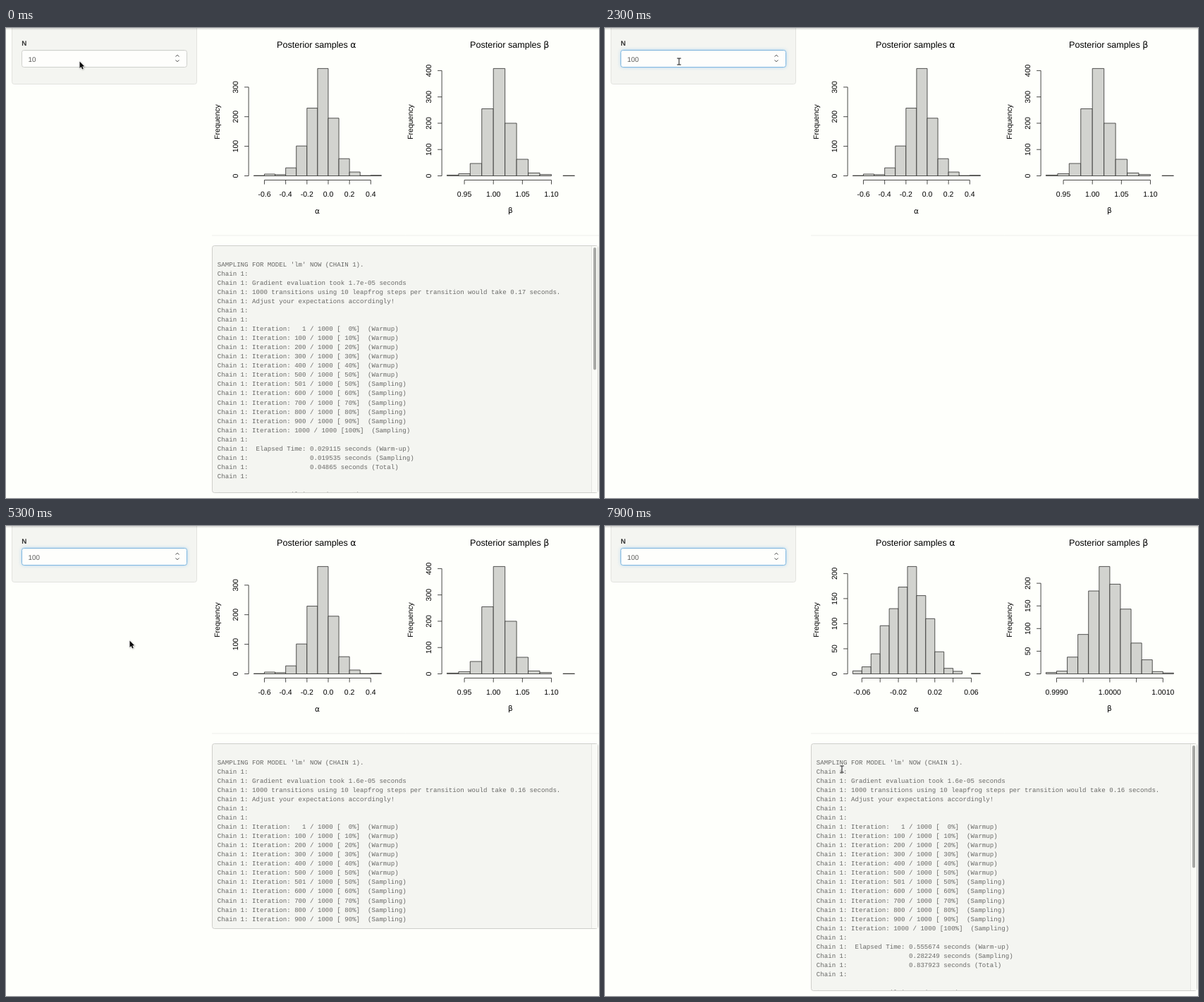
Recreate the animation shown at these times as an HTML page with a canvas. Size 841 by 666 pixels, loop 8 s.

```html
<!DOCTYPE html>
<html lang="en">
<head>
<meta charset="utf-8">
<title>Posterior samples</title>
<style>
  html, body { margin: 0; width: 100%; height: 100%; overflow: hidden; background: #fefffb; }
  canvas { display: block; }
</style>
</head>
<body>
<canvas id="stage" width="841" height="666"></canvas>
<script>
const ctx = document.getElementById('stage').getContext('2d');
const SANS = '"Liberation Sans", Arial, sans-serif';
const MONO = '"Liberation Mono", "Courier New", monospace';
const GREEK = '"DejaVu Sans", sans-serif';
const LOOP = 8000, STEP = 100;
const PAGE = '#fefffb', PANEL = '#f4f5f1', INK = '#1c1c1b', HAIR = 0.8;

const clamp = v => Math.min(1, Math.max(0, v));
const lerp = (a, b, p) => a + (b - a) * p;
const smooth = p => p * p * (3 - 2 * p);

// Draws a string and returns its width.
function text(str, x, y, size, { color = '#000', align = 'left', family = SANS, weight = '', turn = false } = {}) {
  ctx.save();
  ctx.font = `${weight} ${size}px ${family}`;
  ctx.textRendering = 'geometricPrecision';
  ctx.textAlign = align;
  ctx.fillStyle = color;
  ctx.translate(x, y);
  if (turn) ctx.rotate(-Math.PI / 2);
  ctx.fillText(str, 0, 0);
  const { width } = ctx.measureText(str);
  ctx.restore();
  return width;
}

function line(color, width, ...pts) {
  ctx.beginPath();
  pts.forEach(([x, y]) => ctx.lineTo(x, y));
  ctx.strokeStyle = color;
  ctx.lineWidth = width;
  ctx.stroke();
}

function box(x, y, w, h, r, fill, stroke) {
  ctx.beginPath();
  ctx.roundRect(x, y, w, h, r);
  if (fill) { ctx.fillStyle = fill; ctx.fill(); }
  if (stroke) { ctx.strokeStyle = stroke; ctx.lineWidth = HAIR; ctx.stroke(); }
}

// ---- histograms ----
const BASE = 209.5, PEAK = 57.4, SPAN = 181;

const before = [
  { counts: [1, 6, 4, 27, 101, 229, 363, 195, 58, 13, 1, 2], yStep: 100, yMax: 300,
    from: -0.7, to: 0.5, ticks: [-0.6, -0.4, -0.2, 0, 0.2, 0.4], digits: 1, every: 1 },
  { counts: [3, 8, 47, 255, 408, 200, 63, 11, 5, 0, 1], yStep: 100, yMax: 400,
    from: 0.92, to: 1.14, ticks: [0.95, 1, 1.05, 1.1], digits: 2, every: 1 }
];
const after = [
  { counts: [6, 14, 40, 96, 130, 173, 214, 156, 110, 44, 11, 5, 0, 1], yStep: 50, yMax: 200,
    from: -0.07, to: 0.07, ticks: [-0.06, -0.04, -0.02, 0, 0.02, 0.04, 0.06], digits: 2, every: 2 },
  { counts: [3, 6, 37, 87, 183, 237, 198, 143, 68, 31, 5, 2], yStep: 50, yMax: 200,
    from: 0.9988, to: 1.0012, ticks: [0.999, 0.9995, 1, 1.0005, 1.001], digits: 4, every: 2 }
];

function histogram(h, left, symbol, symbolY) {
  const unit = (BASE - PEAK) / Math.max(...h.counts);
  const yAt = n => BASE - n * unit;
  const xAt = v => left + SPAN * (v - h.from) / (h.to - h.from);
  const bin = SPAN / h.counts.length;
  const axisX = left - 7.3, axisY = 215.5, last = h.ticks.length - 1;

  const titleX = left + 32.6;
  const width = text('Posterior samples ', titleX, 28.2, 12.6);
  text(symbol, titleX + width, 28.2, 12.6, { family: GREEK });
  text('Frequency', left - 48, 133, 10.5, { align: 'center', turn: true });
  text(symbol, left + 90, symbolY, 10.5, { align: 'center', family: GREEK });

  h.counts.forEach((n, i) => {
    if (n) box(left + i * bin, yAt(n), bin, n * unit, 0, '#d2d3cf', '#2c2c2b');
  });

  line(INK, HAIR, [axisX, yAt(0)], [axisX, yAt(h.yMax)]);
  for (let n = 0; n <= h.yMax; n += h.yStep) {
    line(INK, HAIR, [axisX - 6, yAt(n)], [axisX, yAt(n)]);
    text(n, left - 22.6, yAt(n), 10.5, { align: 'center', turn: true });
  }
  line(INK, HAIR, [xAt(h.ticks[0]), axisY], [xAt(h.ticks[last]), axisY]);
  h.ticks.forEach((v, i) => {
    line(INK, HAIR, [xAt(v), axisY], [xAt(v), axisY + 6]);
    if (i % h.every === 0) text(v.toFixed(h.digits), xAt(v), 238.6, 10.5, { align: 'center' });
  });
}

// ---- sampler log ----
function sampleLog(setup, warm, sampling, total) {
  const body = [
    '', `Gradient evaluation took ${setup}e-05 seconds`,
    `1000 transitions using 10 leapfrog steps per transition would take 0.${setup.replace('.', '')} seconds.`,
    'Adjust your expectations accordingly!', '', ''
  ];
  for (const n of [1, 100, 200, 300, 400, 500, 501, 600, 700, 800, 900, 1000]) {
    const pct = String(Math.floor(n / 10)).padStart(3);
    body.push(`Iteration: ${String(n).padStart(3)} / 1000 [${pct}%]  (${n > 500 ? 'Sampling' : 'Warmup'})`);
  }
  const gap = ' '.repeat(15);
  body.push('', ` Elapsed Time: ${warm} seconds (Warm-up)`,
    `${gap}${sampling} seconds (Sampling)`, `${gap}${total} seconds (Total)`, '');
  const title = n => `SAMPLING FOR MODEL 'lm' NOW (CHAIN ${n}).`;
  return [title(1), ...body.map(s => 'Chain 1: ' + s), '', title(2)];
}
const firstLog = sampleLog('1.7', '0.029115', '0.019535', '0.04865');
const secondLog = sampleLog('1.6', '0.555674', '0.282249', '0.837923');

function consolePane(lines, bottom, scrolls) {
  const top = 308.5;
  box(292.5, top, 547, bottom - top, 3, PANEL, '#c4c5c1');
  ctx.save();
  ctx.beginPath();
  ctx.rect(293, 309, 546, bottom - 309.5);
  ctx.clip();
  ctx.fillStyle = '#f9faf6';
  ctx.fillRect(831, 309, 8, bottom - 309);
  line('#e4e5e1', 1, [830.5, 309], [830.5, bottom]);
  lines.forEach((s, i) => text(s, 299.8, 338.2 + i * 13.02, 9.12, { family: MONO, color: '#686866' }));
  ctx.restore();
  if (scrolls) box(833, 311, 4, 173.5, 2, '#a7a8a5');
}

// ---- input ----
function inputPanel(t) {
  const focus = t < 900 ? 0 : clamp((t - 800) / 300);
  const value = t < 1900 ? '10' : '100';
  const caret = (t >= 900 && t < 2100) || (t >= 3300 && t < 4500) || (t >= 5700 && t < 6900);

  box(8.5, -10, 262, 89.5, 3, PANEL, '#dddeda');
  text('N', 22.2, 25, 9.8, { weight: 'bold', color: '#333' });

  ctx.save();
  ctx.shadowColor = `rgba(102,175,233,${0.6 * focus})`;
  ctx.shadowBlur = 5.6;
  box(22.5, 31.5, 234, 24, 3, '#fefefc');
  ctx.restore();
  const border = [[198, 102], [199, 170], [195, 220]].map(([a, b]) => Math.round(lerp(a, b, focus)));
  box(22.5, 31.5, 234, 24, 3, null, `rgb(${border})`);
  line('rgba(0,0,0,.04)', 1, [25, 32.5], [254, 32.5]);

  text(value, 31.6, 48.3, 9.8, { color: '#5c5c5b' });
  line('#444', 1, [240.6, 40.6], [243, 38.2], [245.4, 40.6]);
  line('#444', 1, [240.6, 45.4], [243, 47.8], [245.4, 45.4]);
  if (caret) {
    ctx.fillStyle = '#444';
    ctx.fillRect(value.length > 2 ? 48 : 43, 36, 1, 15);
  }
}

// ---- pointer ----
function pointerAt(t) {
  if (t < 100) return [104, 47];
  if (t < 7500) {
    const p = smooth(clamp((t - 3800) / 500));
    return [lerp(105, 175, p), lerp(47.5, 162, p)];
  }
  const p = clamp((t - 7500) / 400), e = p * (1.4 - 0.4 * p);
  return [lerp(199, 336, e), lerp(197, 344.5, e)];
}

function arrow(x, y) {
  ctx.save();
  ctx.translate(x + 0.5, y + 0.5);
  ctx.scale(0.9, 0.9);
  ctx.beginPath();
  for (const [px, py] of [[0, 0], [0, 10.6], [2.4, 8.4], [4, 12.2], [5.8, 11.4], [4.2, 7.8], [7.4, 7.5]]) ctx.lineTo(px, py);
  ctx.closePath();
  ctx.shadowColor = 'rgba(0,0,0,.3)';
  ctx.shadowBlur = 2;
  ctx.shadowOffsetX = ctx.shadowOffsetY = 0.6;
  ctx.strokeStyle = '#fff';
  ctx.lineWidth = 1.2;
  ctx.stroke();
  ctx.shadowColor = 'transparent';
  ctx.fillStyle = '#0b0b0b';
  ctx.fill();
  ctx.restore();
}

function beam(x, y) {
  for (const [color, width] of [['rgba(255,255,255,.8)', 2.4], ['#262626', 1.1]]) {
    line(color, width, [x, y - 4.5], [x, y + 4.5]);
    for (const dy of [-4.5, 4.5]) line(color, width, [x - 2.8, y + dy], [x + 2.8, y + dy]);
  }
}

function pointer(t) {
  const [x, y] = pointerAt(t);
  const overInput = t >= 100 && y < 56;
  const overLog = x > 292 && y > 322;
  (overInput || overLog ? beam : arrow)(x, y);
}

function draw(t) {
  ctx.fillStyle = PAGE;
  ctx.fillRect(0, 0, 841, 666);

  inputPanel(t);
  const plots = t < 7700 ? before : after;
  histogram(plots[0], 351.4, 'α', 263.2);
  histogram(plots[1], 625.4, 'β', 261.6);
  line('#e9eae6', HAIR, [292, 294], [841, 294]);

  if (t < 2300) consolePane(firstLog, 658.5, true);
  else if (t >= 6300) consolePane(secondLog, 658.5, true);
  else if (t >= 5300) consolePane(secondLog.slice(0, 18), 570.5, false);

  const shade = ctx.createLinearGradient(0, 0, 0, 3);
  shade.addColorStop(0, 'rgba(0,0,0,.16)');
  shade.addColorStop(1, 'rgba(0,0,0,0)');
  ctx.fillStyle = shade;
  ctx.fillRect(0, 0, 841, 3);

  pointer(t);
}

const start = performance.now();
function frame() {
  const t = (performance.now() - start) % LOOP;
  draw(Math.floor(t / STEP) * STEP);
  requestAnimationFrame(frame);
}
frame();
</script>
</body>
</html>
```
